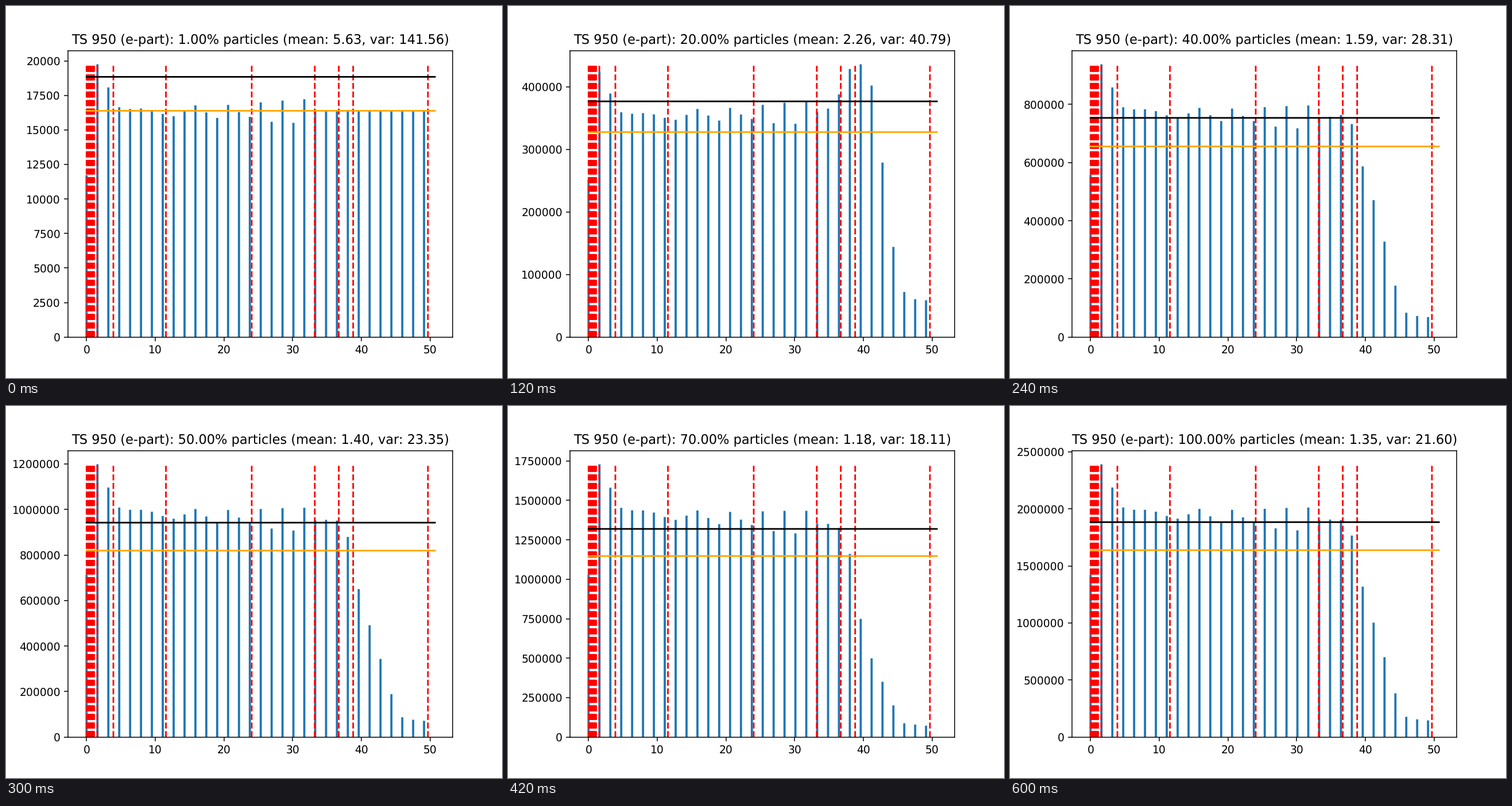
A matplotlib script that plays this animation: 864 px wide and 648 px high, repeating every 630 ms.

```python
import numpy as np
import matplotlib.pyplot as plt
from matplotlib.animation import FuncAnimation

N_FRAMES = 21
N_BINS = 32
STEP = 1.584
MEAN_COUNT = 1638400

# Share of particles seen, size of the late bump, mean and variance.
stages = [(0.20, 1.00, 2.26, 40.79), (0.40, 0.35, 1.59, 28.31),
          (0.60, 0.13, 1.26, 19.95), (0.70, 0.04, 1.18, 18.11),
          (0.85, 0.00, 1.07, 15.41), (1.00, 0.23, 1.35, 21.60)]
start = (0.01, 0.00, 5.63, 141.56)
shares, bumps, means, variances = np.array([start] + stages).T

bins = np.arange(N_BINS)


def ripple():
    """Peak in the second bin, then a wave that quickens and grows."""
    x = bins - 4.5
    chirp = 0.0027 * bins * np.cos(np.pi * (0.02815 * x + 0.2088) * x)
    return 0.208 * 0.5 ** (bins - 1) ** 2 + np.where(bins > 20, 0, chirp)


def histogram(share, base, bump):
    """Bin counts whose average is the expected count for this share."""
    shape = base + ripple() + bump * (
        0.004 * bins + 0.76 * np.exp(-(bins - 25.7) ** 2 / 3.6))
    shape[0] *= 0.65
    return share * MEAN_COUNT * shape / shape.mean()


fall = np.interp(bins, [22, 23, 24, 25, 26, 28, 29, 31],
                 [1, 0.98, 0.85, 0.53, 0.34, 0.14, 0.06, 0.05])
settled = (1.02 - 0.003 * bins) * fall
counts = np.array([histogram(start[0], 1, 0)]
                  + [histogram(s, settled, b) for s, b, *_ in stages])


def log_interp(share, values):
    return np.exp(np.interp(np.log(share), np.log(shares), np.log(values)))


plt.rcParams["text.hinting"] = "no_hinting"
fig, ax = plt.subplots(figsize=(6.4, 4.8), dpi=135)
width = 0.2 * STEP
end = N_BINS * STEP
bars = ax.bar(bins * STEP, np.ones(N_BINS), width, snap=False)

marks = [*np.linspace(0, 1.1, 14),
         1.57, 3.9, 11.55, 24.03, 33.21, 36.7, 38.79, 49.67]
mark_lines = [ax.plot([x, x], [0, 1], "r--", snap=False)[0] for x in marks]
limit_line, = ax.plot([0, end], [1, 1], color="black", snap=False)
mean_line, = ax.plot([0, end], [1, 1], color="orange", snap=False)

title = ax.set_title("")
pad = 0.05 * (end + width / 2)
ax.set_xlim(-width / 2 - pad, end + pad)
ax.ticklabel_format(axis="y", style="plain", useOffset=False)


def update(i):
    share = max(0.05 * i, 0.01)
    heights = [np.interp(share, shares, column) for column in counts.T]
    top = max(heights)
    for bar, height in zip(bars, heights):
        bar.set_height(height)
    for line in mark_lines:
        line.set_ydata([0, top])
    level = share * MEAN_COUNT
    mean_line.set_ydata([level, level])
    limit_line.set_ydata([1.15 * level, 1.15 * level])
    ax.set_ylim(0, 1.05 * top)
    title.set_text(f"TS 950 (e-part): {share:.2%} particles "
                   f"(mean: {log_interp(share, means):.2f}, "
                   f"var: {log_interp(share, variances):.2f})")
    return []


anim = FuncAnimation(fig, update, frames=N_FRAMES, interval=30,
                     init_func=lambda: update(0), repeat=True)
plt.show()
```
